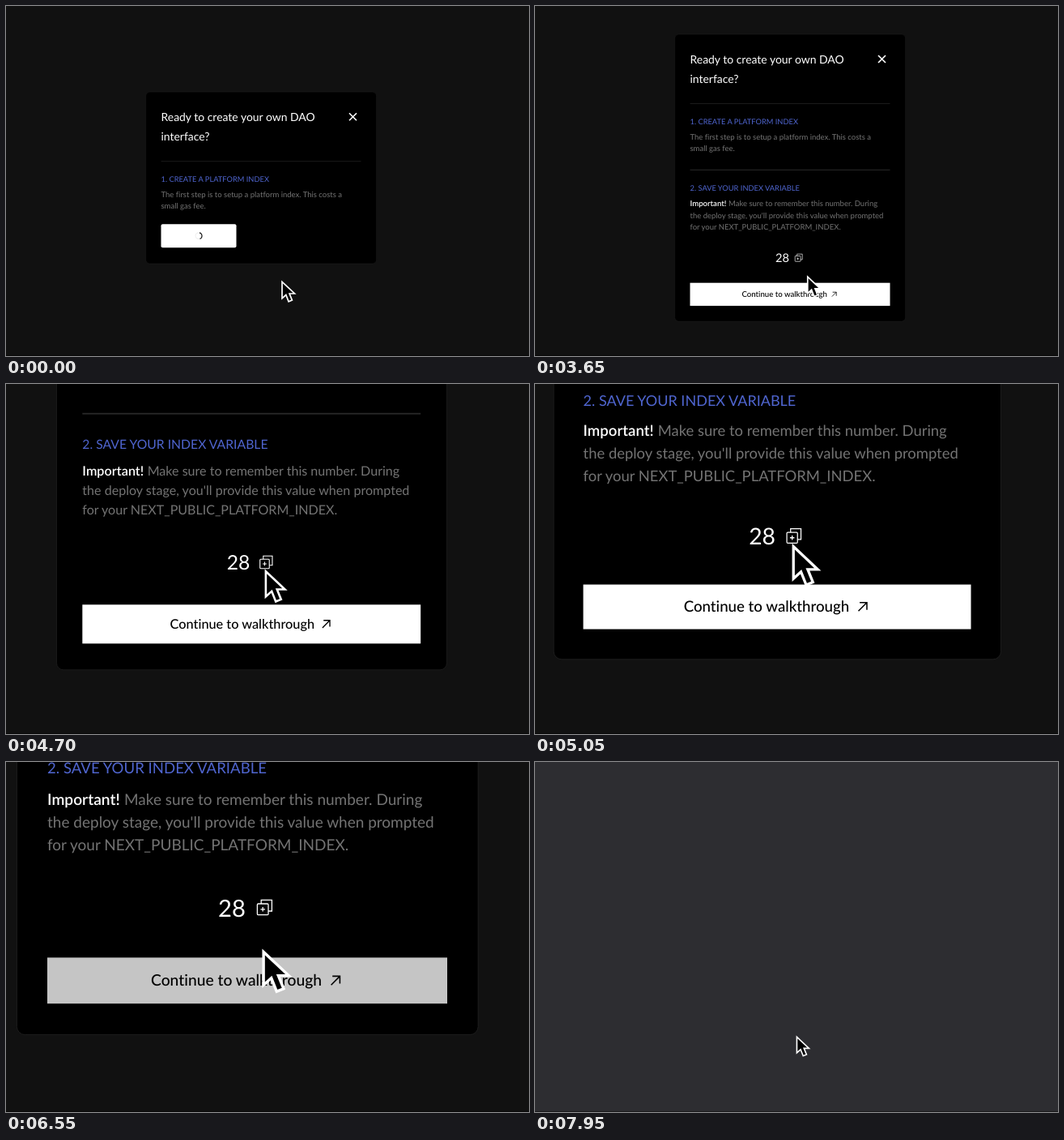
Write an HTML page that moves like this. It is 646x432 px and loops after 8000 ms.

```html
<!DOCTYPE html>
<html lang="en">
<head>
<meta charset="utf-8">
<title>Dialog walkthrough</title>
<style>
  html, body { margin: 0; width: 100%; height: 100%; overflow: hidden; background: #111; }
  svg { display: block; width: 100%; height: 100%; }
  text {
    font-family: Lato, "Open Sans", sans-serif; font-variant-ligatures: none;
    text-rendering: geometricPrecision; white-space: pre;
  }
  .title { font-size: 13.95px; fill: #fff; }
  .head { font-size: 9.3px; fill: #4f65cf; }
  .body { font-size: 9.5px; fill: #737373; }
  .strong { font-size: 9.6px; font-weight: 600; fill: #fff; }
  .count { font-size: 14.6px; fill: #fff; }
  .label { font-size: 9.65px; font-weight: 500; fill: #000; }
  .line { fill: none; stroke: #fff; }
</style>
</head>
<body>
<svg viewBox="0 0 646 432" preserveAspectRatio="none">
  <defs>
    <clipPath id="clip"><rect id="clipBox" x="172.7" width="284.9"/></clipPath>
  </defs>
  <rect id="backdrop" width="646" height="432"/>

  <g id="page">
    <rect id="panel" x="172.7" width="284.9" rx="5" stroke="#1e1e1e" stroke-width=".5"/>
    <g clip-path="url(#clip)">
      <g id="content">
        <text class="title" x="191.5" y="71">Ready to create your own DAO</text>
        <text class="title" x="191.5" y="95">interface?</text>
        <path class="line" stroke-width="1.6" d="M424 61l9 9m0-9l-9 9"/>
        <path d="M191.5 120.5h247" stroke="#1b1b1b"/>
        <text class="head" x="191.5" y="146">1. CREATE A PLATFORM INDEX</text>
        <text class="body" x="191.5" y="165">The first step is to setup a platform index. This costs a</text>
        <text class="body" x="191.5" y="179.2">small gas fee.</text>

        <g id="loading">
          <rect x="191.5" y="198" width="93" height="29" rx="2" fill="#fff"/>
          <circle cx="238" cy="212.5" r="4" fill="none" stroke="#eee"/>
          <path d="M239 208.6a4 4 0 0 1 .5 7.6" fill="none" stroke="#222" stroke-width="1.2"/>
        </g>

        <g id="second">
          <path d="M191.5 202.3h247" stroke="#2a2a2a"/>
          <text class="head" x="191.5" y="227.9">2. SAVE YOUR INDEX VARIABLE</text>
          <text class="strong" x="191.5" y="247.3">Important!</text>
          <text class="body" x="239" y="247.3">Make sure to remember this number. During</text>
          <text class="body" x="191.5" y="261.5">the deploy stage, you'll provide this value when prompted</text>
          <text class="body" x="191.5" y="275.7">for your NEXT_PUBLIC_PLATFORM_INDEX.</text>
          <text class="count" x="297" y="316.3">28</text>
          <g class="line" stroke-width=".65">
            <rect x="321.2" y="308.5" width="6.8" height="6.8" rx=".6"/>
            <path d="M323.6 308.5v-2.3h6.6v6.8h-2.2M324.6 310.5v2.8m-1.4-1.4h2.8"/>
          </g>
          <rect id="button" x="191.5" y="341.7" width="247" height="28.4"/>
          <text class="label" x="255.5" y="359.2">Continue to walkthrough</text>
          <path d="M366.8 358.6l5.4-5.4m-4.6 0h4.6v4.6" fill="none" stroke="#000" stroke-width=".8"/>
        </g>
      </g>
    </g>
  </g>

  <path id="cursor" d="M.5 1.6V22L5.3 17.7L8.6 26L12.9 24.3L9.6 16.2H16Z"
        fill="#000" stroke="#fff" stroke-width="1.7" stroke-linejoin="miter"/>
  <path d="M0 431.5h646" stroke="#000" stroke-opacity=".45"/>
</svg>

<script>
const LOOP = 8000, PAGE_CHANGE = 7700;
const FOCUS = { x: 332, y: 442 };
const el = id => document.getElementById(id);
const set = (id, attrs) => {
  for (const name in attrs) el(id).setAttribute(name, attrs[name]);
};
const ramp = (t, from, to) => Math.min(1, Math.max(0, (t - from) / (to - from)));

// Critically damped spring from 0 to 1.
const spring = (t, start) => {
  const k = Math.max(0, t - start) * 0.006;
  return 1 - (1 + k) * Math.exp(-k);
};

function drawDialog(t) {
  const open = 1 - (1 - ramp(t, 20, 450)) ** 3;
  const shift = 71.2 * (1 - open);
  const box = { y: 34.9 + shift, height: 354.4 - 2 * shift };
  set('panel', box);
  set('clipBox', box);
  set('content', { transform: `translate(0 ${shift})` });
  set('loading', { opacity: t < 50 ? 1 : 0 });
  set('second', { opacity: open });
  const shade = 255 - 58 * ramp(t, 6380, 6530);
  set('button', { fill: `rgb(${shade},${shade},${shade})` });
}

function drawCursor(t, zoom) {
  const toIcon = spring(t, 3480), toButton = spring(t, 6240);
  const x = 340.5 - 15.6 * toIcon - 0.6 * toButton;
  const y = 338.8 - 22.9 * toIcon + 37.3 * toButton;
  const press = 0.1 * ramp(t, 4500, 4650) * (1 - ramp(t, 4750, 4950))
              + 0.18 * ramp(t, 7500, 7700);
  const sx = FOCUS.x + (x - FOCUS.x) * zoom;
  const sy = FOCUS.y + (y - FOCUS.y) * zoom;
  set('cursor', { transform: `translate(${sx} ${sy}) scale(${zoom * (1 - press)})` });
}

function draw(t) {
  const zoom = 1 + spring(t, 4300) - spring(t, 7420);
  const onDialog = t < PAGE_CHANGE;
  set('backdrop', { fill: onDialog ? '#111' : '#2d2d31' });
  set('page', {
    visibility: onDialog ? 'visible' : 'hidden',
    transform: `translate(${FOCUS.x * (1 - zoom)} ${FOCUS.y * (1 - zoom)}) scale(${zoom})`
  });
  drawDialog(t);
  drawCursor(t, zoom);
}

let began;
function tick(now) {
  began ??= now;
  draw((now - began) % LOOP);
  requestAnimationFrame(tick);
}
draw(0);
requestAnimationFrame(tick);
</script>
</body>
</html>
```
